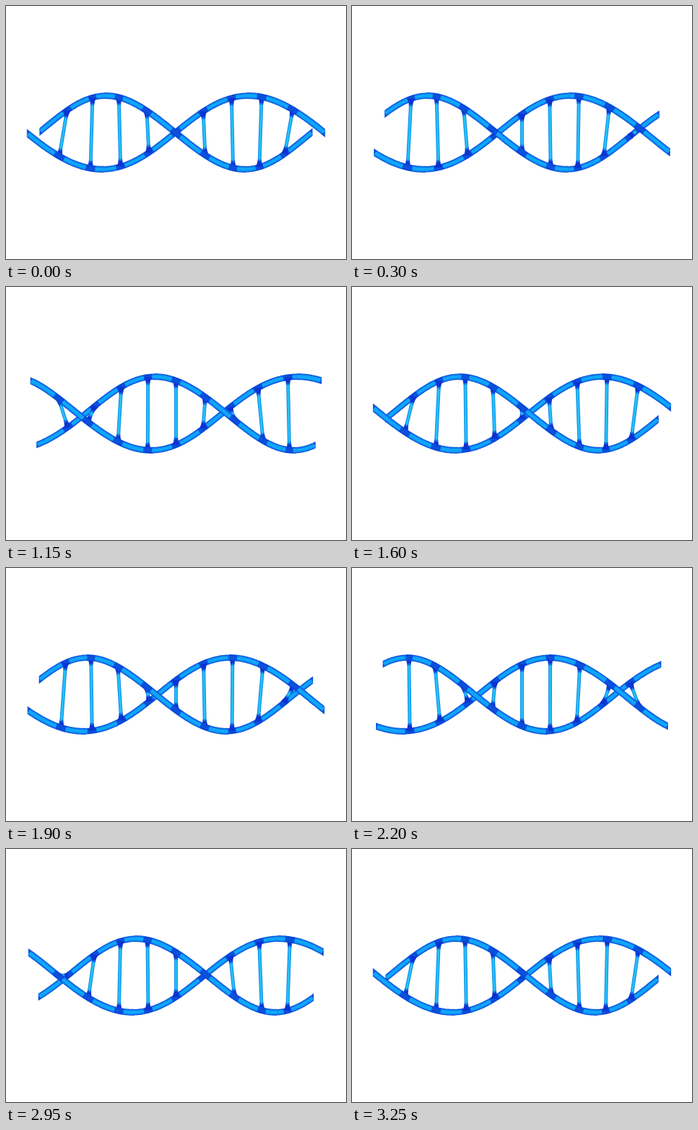
An HTML page with a canvas that plays this animation: 483x360 px, repeating every 3300 ms.

```html
<!DOCTYPE html>
<html lang="en">
<head>
<meta charset="utf-8">
<title>Rotating double helix</title>
<style>
  html, body { margin: 0; width: 100%; height: 100%; overflow: hidden; background: #fff; }
  canvas { display: block; width: 483px; height: 360px; }
</style>
</head>
<body>
<canvas id="stage" width="483" height="360"></canvas>
<script>
const ctx = document.getElementById('stage').getContext('2d');
const LOOP = 3300, TICK = 50;
const CX = 241.5, CY = 180, RADIUS = 52.3, HALF = 202.5, WAVE = 405, DEPTH = 0.044;
const RUNGS = Array.from({ length: 9 }, (_, i) => (i - 4) * 40);
const EDGE = '#0c4fd8', BODY = '#0a80ee', GLOW = '#10a6fb', JOINT = '#0a34d2';

// Travel of the wave to the left: [time, distance]
const TRAVEL = [[0, 1], [600, 69.6], [1150, 134], [1600, 192.5],
                [2200, 267], [2600, 320], [3250, 399.5], [LOOP, 406]];

function travelAt(t) {
  const i = TRAVEL.findIndex(([time]) => time > t);
  const [t0, d0] = TRAVEL[i - 1], [t1, d1] = TRAVEL[i];
  return d0 + (d1 - d0) * (t - t0) / (t1 - t0);
}

// Point of a strand (0 or 1) at axis position x, seen in perspective
function project(x, strand, travel) {
  const angle = 2 * Math.PI * (x + HALF + travel) / WAVE + strand * Math.PI;
  const z = Math.cos(angle);
  const scale = 1 / (1 - DEPTH * z);
  return { x: CX + x * scale, y: CY + RADIUS * Math.sin(angle) * scale, z };
}

function line(points, width, color) {
  ctx.beginPath();
  points.forEach(p => ctx.lineTo(p.x, p.y));
  ctx.lineWidth = width;
  ctx.strokeStyle = color;
  ctx.stroke();
}

// Runs of neighbouring points that lie on the front or the back side
function runs(from, to, strand, travel, front) {
  const found = [];
  let run = null;
  for (let x = from; x <= to + 0.01; x += 1.5) {
    const p = project(x, strand, travel);
    if ((p.z >= 0) === front) {
      if (!run) found.push(run = []);
      run.push(p);
    } else if (run) {
      run.push(p);
      run = null;
    }
  }
  return found;
}

function drawStrand(strand, travel, front) {
  const width = front ? 9.2 : 8.6, over = 4.5;
  const left = project(-HALF, strand, travel).x, right = project(HALF, strand, travel).x;
  const patch = (from, to, w, color) =>
    runs(from, to, strand, travel, front).forEach(run => line(run, w, color));

  // Both tips are cut upright
  ctx.save();
  ctx.beginPath();
  ctx.rect(left, 0, right - left, 360);
  ctx.clip();
  patch(-HALF - over, HALF + over, width, EDGE);
  patch(1.5 - HALF, HALF - 1.5, width - 2, BODY);
  patch(1.5 - HALF, HALF - 1.5, width - 4.8, GLOW);
  ctx.globalAlpha = 0.75;
  for (const x of RUNGS) patch(x - 6, x + 6, width - 1.6, JOINT);
  ctx.restore();
}

function drawRung(x, travel) {
  const a = project(x, 0, travel), b = project(x, 1, travel);
  const length = Math.hypot(b.x - a.x, b.y - a.y);
  if (length < 8) return;
  const flare = Math.min(12, length / 2.2);

  ctx.save();
  ctx.translate(a.x, a.y);
  ctx.rotate(Math.atan2(b.y - a.y, b.x - a.x));
  const shade = (end, mid) => {
    const g = ctx.createLinearGradient(0, 0, length, 0), k = flare / length;
    [[0, end], [k * 0.6, end], [k, mid], [1 - k, mid], [1 - k * 0.6, end], [1, end]]
      .forEach(([at, color]) => g.addColorStop(at, color));
    return g;
  };
  ctx.beginPath();
  ctx.moveTo(0, -5);
  ctx.quadraticCurveTo(flare / 2, -2.7, flare, -2.5);
  ctx.lineTo(length - flare, -2.5);
  ctx.quadraticCurveTo(length - flare / 2, -2.7, length, -5);
  ctx.lineTo(length, 5);
  ctx.quadraticCurveTo(length - flare / 2, 2.7, length - flare, 2.5);
  ctx.lineTo(flare, 2.5);
  ctx.quadraticCurveTo(flare / 2, 2.7, 0, 5);
  ctx.fillStyle = shade(JOINT, '#0f86e6');
  ctx.fill();
  line([{ x: flare * 0.6, y: 0 }, { x: length - flare * 0.6, y: 0 }], 3, shade(JOINT, '#22c2f8'));
  ctx.restore();
}

function draw(now) {
  const t = Math.floor((now % LOOP) / TICK) * TICK;
  const travel = travelAt(t);
  ctx.fillStyle = '#fff';
  ctx.fillRect(0, 0, 483, 360);
  ctx.lineJoin = 'round';
  for (const s of [0, 1]) drawStrand(s, travel, false);
  for (const x of RUNGS) drawRung(x, travel);
  for (const s of [0, 1]) drawStrand(s, travel, true);
}

const start = performance.now();
function loop() {
  draw(performance.now() - start);
  requestAnimationFrame(loop);
}
loop();
</script>
</body>
</html>
```
